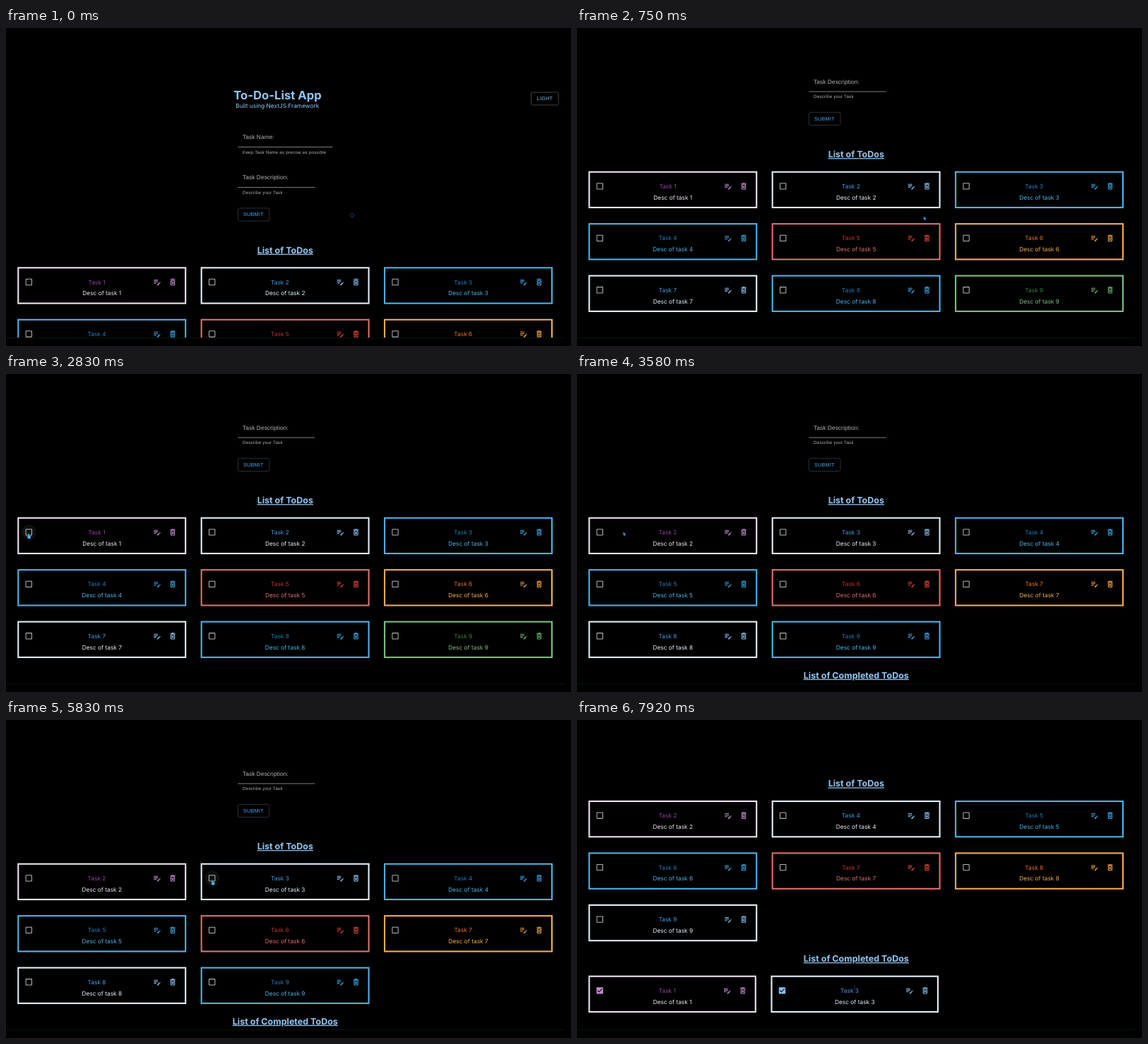
Animation of 800x450 px, one loop 8 s. Source, as an HTML page:

```html
<!DOCTYPE html>
<html lang="en">
<head>
<meta charset="utf-8">
<title>To-Do-List App</title>
<style>
html, body { margin: 0; width: 100%; height: 100%; overflow: hidden; background: #000; }
svg { display: block; width: 800px; height: 450px; }
text { font: 8.33px Inter, sans-serif; text-rendering: geometricPrecision; }
.mid { text-anchor: middle; }
.head { font-size: 12.5px; font-weight: 700; fill: #90c6f5; text-anchor: middle; text-decoration: underline; }
.title { font-size: 16.67px; font-weight: 700; fill: #90c6f5; text-anchor: middle; }
.form { font-family: "Liberation Sans", Arial, sans-serif; fill: #b3b3b3; letter-spacing: .00938em; }
.help { font-size: 6.25px; letter-spacing: .0333em; }
.btn { font-size: 7.29px; letter-spacing: .02857em; }
</style>
</head>
<body>
<svg viewBox="0 0 800 450">
  <defs>
    <clipPath id="view"><rect y="66" width="800" height="372.5"/></clipPath>
    <path id="empty" d="M19 5v14H5V5h14m0-2H5c-1.1 0-2 .9-2 2v14c0 1.1.9 2 2 2h14c1.1 0 2-.9 2-2V5c0-1.1-.9-2-2-2z"/>
    <path id="checked" d="M19 3H5c-1.11 0-2 .9-2 2v14c0 1.1.89 2 2 2h14c1.11 0 2-.9 2-2V5c0-1.1-.89-2-2-2zm-9 14l-5-5 1.41-1.41L10 14.17l7.59-7.59L19 8l-9 9z"/>
    <path id="edit" d="M3 10h11v2H3zm0-4h11v2H3zm0 8h7v2H3zm15.01-1.13.71-.71c.39-.39 1.02-.39 1.41 0l.71.71c.39.39.39 1.02 0 1.41l-.71.71zm-.71.71-5.3 5.3V21h2.12l5.3-5.3z"/>
    <path id="trash" d="M14.12 10.47 12 12.59l-2.13-2.12-1.41 1.41L10.59 14l-2.12 2.12 1.41 1.41L12 15.41l2.12 2.12 1.41-1.41L13.41 14l2.12-2.12zM15.5 4l-1-1h-5l-1 1H5v2h14V4zM6 19c0 1.1.9 2 2 2h8c1.1 0 2-.9 2-2V7H6zM8 9h8v10H8z"/>
  </defs>
  <g clip-path="url(#view)">
    <g id="page">
      <text class="title" x="384.5" y="101">To-Do-List App</text>
      <text class="mid" x="384.3" y="113.1" fill="#90c6f5">Built using NextJS Framework</text>
      <g fill="none">
        <rect x="743.5" y="91" width="38.8" height="18" rx="2" stroke="#3a434a"/>
        <rect x="328.5" y="254.9" width="44.4" height="18.2" rx="2" stroke="#26313a"/>
        <path d="M328.3 168.4h134M328.3 225.6h109.2" stroke="#a0a0a0" stroke-width=".8"/>
      </g>
      <text class="form btn" x="751.8" y="102.3" style="fill:#7fbdf0">LIGHT</text>
      <text class="form btn" x="336" y="266.4" style="fill:#42a5f5">SUBMIT</text>
      <text class="form" x="335" y="157.2">Task Name:</text>
      <text class="form help" x="335" y="177.5">Keep Task Name as precise as possible</text>
      <text class="form" x="335" y="214.2">Task Description:</text>
      <text class="form help" x="335" y="234.5">Describe your Task</text>
      <text class="head" x="395.3" y="318.7">List of ToDos</text>
      <circle id="hover" r="10.4" cy="359.5" fill="#dff"/>
      <g id="lists"></g>
    </g>
  </g>
  <path d="M0 438.5h790" stroke="#041512"/>
  <g id="mouse">
    <circle r="2.5" fill="none" stroke="#2f6fc0" stroke-dasharray="1.3 .9"/>
    <path d="M0 0v5l1.2-1 1 1.9 1-.5-.9-1.8h1.6z" fill="#2f9be6"/>
    <path d="M-1.4-3.6h1v2.9l3 .7v2L1.9 3.8h-3L-3 .9l.5-.7 1.1.8z" fill="#42b4f0"/>
    <path d="M-1-3h2M0-3v6M-1 3h2" stroke="#3a4248" stroke-width=".7"/>
  </g>
</svg>
<script>
const $ = id => document.getElementById(id);
const LOOP = 8000, FIRST = 2920, SECOND = 6000;

// palettes: [main, light, dark]
const purple = ['#c48bd0', '#f1e4f3', '#963fa5'], blue = ['#88c0ee', '#e3f0fa', '#429eea'],
  cyan = ['#38a6e4', '#4db4ea', '#1f7cbe'], red = ['#e2423a', '#e0706f', '#c4332f'],
  orange = ['#f5a33c', '#f4ae4e', '#ee7026'], green = ['#66b46a', '#7dc180', '#39823c'];
const themes = [purple, blue, cyan, cyan, red, orange, blue, cyan, green];

const icon = (id, x, y, fill) =>
  `<use href="#${id}" fill="${fill}" transform="translate(${x - 6.25} ${y - 6.25}) scale(.5208)"/>`;

function card(n, i, top, done) {
  const [main, light, dark] = themes[i];
  const w = done ? 237.6 : 239;
  const x = 16.3 + i % 3 * (done ? 258.2 : 259.4);
  const y = top + Math.floor(i / 3) * 73.45;
  return `<rect x="${x + 1}" y="${y + 1}" width="${w - 2.1}" height="50.3" fill="none" stroke="${light}" stroke-width="2.08"/>
    ${icon(done ? 'checked' : 'empty', x + 16, y + 21.2, done ? main : '#b3b3b3')}
    <text class="mid" x="${x + w / 2 - 7.3}" y="${y + 24.2}" fill="${dark}">Task ${n}</text>
    <text class="mid" x="${x + w / 2}" y="${y + 40}" fill="${light}">Desc of task ${n}</text>
    ${icon('edit', x + w - 41.3, y + 21.2, main)}${icon('trash', x + w - 19.2, y + 21.2, main)}`;
}

function lists(done) {
  const open = [1, 2, 3, 4, 5, 6, 7, 8, 9].filter(n => !done.includes(n));
  let html = open.map((n, i) => card(n, i, 338.3)).join('');
  if (done.length) html += '<text class="head" x="395.3" y="566.3">List of Completed ToDos</text>';
  return `<g>${html}${done.map((n, i) => card(n, i, 586, true)).join('')}</g>`;
}

$('lists').innerHTML = lists([]) + lists([1]) + lists([1, 3]);

// pointer: [time, x, y, shape] with shapes 0 ring, 1 arrow, 2 hand, 3 caret
const track = [
  [0, 490, 265, 0], [90, 490, 265, 1], [500, 490.8, 266.5, 1], [920, 490.8, 266.5, 1],
  [1600, 92.3, 211.5, 1], [1900, 92.3, 211.5, 1], [2330, 32.5, 229, 2], [3340, 32.5, 229, 1],
  [3560, 65.5, 223.5, 1], [3600, 65.5, 223.5, 1], [4000, 211, 231, 1], [4170, 211, 231, 1],
  [4450, 92, 222, 1], [4830, 333, 241, 1], [5000, 333, 241, 1], [5500, 293, 229.8, 2],
  [6830, 293, 229.3, 1], [7500, 393, 379, 3], [8000, 393, 379, 3]
];

const ease = (t, a, b) => {
  const p = Math.min(1, Math.max(0, (t - a) / (b - a)));
  return p * p * (3 - 2 * p);
};
const pulse = (t, a, b) => ease(t, a, a + 150) - ease(t, b, b + 150);

function draw(t) {
  $('page').setAttribute('transform', `translate(0 ${-135.6 * ease(t, 80, 660) - 88.7 * ease(t, 6250, 6600)})`);
  const state = (t >= FIRST) + (t >= SECOND);
  [...$('lists').children].forEach((g, i) => g.style.display = i === state ? '' : 'none');

  $('hover').setAttribute('cx', t < 4500 ? 32.3 : 291.7);
  $('hover').setAttribute('opacity', .065 * (pulse(t, 2300, 3350) + pulse(t, 5450, 6830)));

  const k = track.findLastIndex(p => p[0] <= t);
  const [t0, x0, y0, shape] = track[k], [t1, x1, y1] = track[k + 1];
  const p = ease(t, t0, t1);
  $('mouse').setAttribute('transform', `translate(${x0 + (x1 - x0) * p} ${y0 + (y1 - y0) * p})`);
  [...$('mouse').children].forEach((g, i) => g.style.display = i === shape ? '' : 'none');
}

function tick() {
  draw(performance.now() % LOOP);
  requestAnimationFrame(tick);
}
tick();
</script>
</body>
</html>
```
